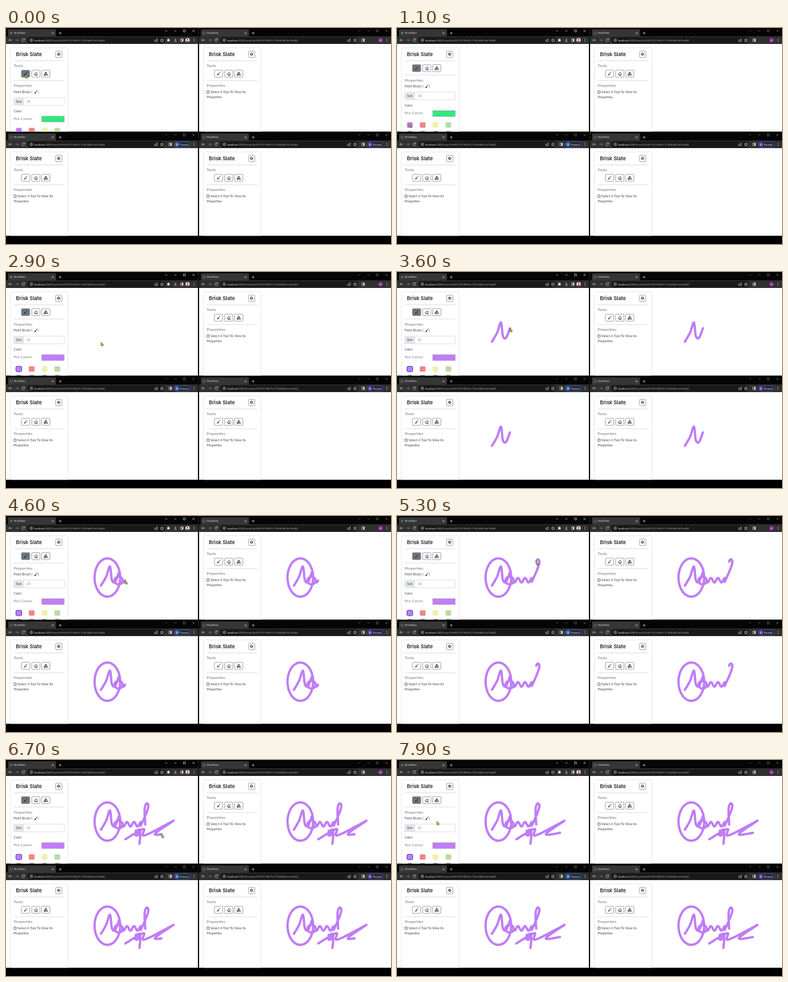
Animation, 600 px wide and 338 px high, one loop 8000 ms. Source, as an HTML page:

```html
<!DOCTYPE html>
<html lang="en">
<head>
<meta charset="utf-8">
<title>Shared whiteboard</title>
<style>
html, body { margin: 0; width: 100%; height: 100%; overflow: hidden; background: #000; }
svg { display: block; width: 600px; height: 338px; }
text { font-family: Lato, sans-serif; font-size: 5.2px; fill: #4a4a4a; }
.title { font: 600 7.9px Inter, sans-serif; fill: #222; }
.head { font-size: 6.4px; fill: #777; }
.soft { fill: #858585; }
.ui { font: 4.05px Roboto, sans-serif; fill: #ddd; }
.dim { fill: #9aa0a6; }
.line { stroke: #d2d2d2; stroke-width: .7; }
.btn { fill: #fff; stroke: #7b8289; stroke-width: .7; }
.on { fill: #6c757d; }
.ico { fill: none; stroke: #d0d0d0; stroke-width: .7; }
.glyph { fill: none; stroke: #222; stroke-width: .9; }
#ink { fill: none; stroke: #bf7cf6; stroke-width: 3.6; stroke-linecap: round; stroke-linejoin: round; }
</style>
</head>
<body>
<svg id="stage" viewBox="0 0 600 338"></svg>
<script>
const LOOP = 8000, STEP = 100, SCROLL_AT = 700, PICK_AT = 1400, ICON_AT = 3000;
const PURPLE = '#c27cfb', GREEN = '#2fe97c';
const HASH = 'de9f6723198fd7c710e9d4b7ea7de4b2';

const rect = (x, y, w, h, attrs = '') => `<rect x="${x}" y="${y}" width="${w}" height="${h}" ${attrs}/>`;
const text = (x, y, s, cls = '') => `<text x="${x}" y="${y}" class="${cls}">${s}</text>`;
const path = (d, cls = 'ico', attrs = '') => `<path d="${d}" class="${cls}" ${attrs}/>`;
const dot = (x, y, r, attrs) => `<circle cx="${x}" cy="${y}" r="${r}" ${attrs}/>`;
const rule = y => path(`M12 ${y}H91`, 'line');

const brush = (x, y) => path(`M${x + 2.4} ${y - 2.6}L${x - .4} ${y + .6}`, 'glyph') +
  path(`M${x - 1} ${y}l1.4 1.2q-.8 1.8-3 1.3q1-.7 1.6-2.5z`, '', 'fill="#222"');

const gear = dot(82, 41, 1.5, 'class="glyph"') +
  dot(82, 41, 2.1, 'class="glyph" stroke-dasharray=".8 .85"');

function tools(active) {
  const box = (x, on) => rect(x, 66, 13, 11, `rx="1.6" class="btn ${on ? 'on' : ''}"`);
  return box(24, active) + box(40) + box(55.5) + brush(30.5, 71.5) +
    path('M44.3 72l2.6-2.6 2.1 1.8-2.6 2.7h-1.2zM46.4 74h3', 'glyph') +
    path('M62 68.8l1.5 2.2h-3zM59.4 72.3h2v1.8h-2z', 'glyph') + dot(63.7, 73.2, 1, 'class="glyph"');
}

function brushPanel() {
  const row = ['#c27cfb', '#f48484', '#eef2aa', '#bbdca2'];
  return text(12, 102, 'Paint Brush (') + brush(46.5, 100) + text(50, 102, ')') +
    rect(12, 109, 79, 12, 'rx="1.2" fill="#fff" stroke="#ced4da" stroke-width=".7"') +
    rect(12.3, 109.3, 16, 11.4, 'fill="#e3e6ea"') + text(15.5, 116.8, 'Size') + text(32, 116.8, '10', 'soft') +
    text(12, 131.8, 'Color') + text(12, 143.8, 'Pick Custom', 'soft') +
    rect(55.8, 138, 35, 9, `id="picked" fill="${GREEN}" stroke="#999" stroke-width=".6"`) +
    row.map((c, i) => rect(15.5 + 20 * i, 156.3, 9, 8.4, `rx="1.8" fill="${c}"`) +
      rect(15.5 + 20 * i, 170.2, 9, 8.4, 'rx="1.8" fill="#24242a"')).join('') +
    rect(15.5, 156.3, 9, 8.4, 'id="chosen" rx="1.8" fill="none" stroke="#3a49c9"');
}

const hint = dot(14.2, 100.2, 2.3, 'class="glyph" style="stroke-width:.6"') +
  '<text x="14.2" y="101.7" text-anchor="middle" style="font-size:4.2px">?</text>' +
  text(18, 102, 'Select A Tool To View Its') + text(12, 110, 'Properties');

function paused(color) {
  return rect(261.5, 14.8, 26.5, 8.6, `rx="4.3" fill="#262a35" stroke="${color}" stroke-width=".6"`) +
    dot(266.5, 19.1, 3.1, `fill="${color}"`) + text(265.2, 20.5, 'A', 'ui') + text(271, 20.6, 'Paused', 'ui');
}

function chrome(main, badge) {
  const sideX = main ? 274 : 256;
  return rect(0, 0, 299.3, 25, 'fill="#050505"') +
    rect(3, 2, 75, 14, 'rx="2" fill="#363636"') +
    dot(8, 8, 1.8, main ? 'id="icon" fill="#3f8fb5"' : 'fill="#242424" stroke="#aaa" stroke-width=".6"') +
    text(12.5, 9.4, 'BriskSlate', 'ui') +
    path('M71.2 6.5l3 3m0-3l-3 3M84.5 6v4m-2-2h4') +
    path('M262.5 4.5h3M276.5 3h3v3h-3zM290.8 3l3 3m0-3l-3 3M248 3.8l1.5 1.5 1.5-1.5', 'ico', main ? '' : 'opacity=".5"') +
    rect(0, 13, 299.3, 12, 'fill="#303030"') + rect(33, 14.2, 215, 9.8, 'rx="4.9" fill="#191919"') +
    path('M9.5 19h-5l2-2m-2 2l2 2') + path('M14.5 19h5l-2-2m2 2l-2 2', 'ico', 'opacity=".5"') +
    path('M28.8 17.6a2.2 2.2 0 1 0 .3 2M29.2 16.2v1.9h-1.9') +
    dot(39.5, 19, 2, 'class="ico"') + path('M39.5 18.6v1.5M39.5 17.6v.5') +
    `<text x="44" y="20.5" class="ui">localhost<tspan class="dim">:3000/board/${HASH}</tspan></text>` +
    path('M232 18v3h4v-2M233.5 19.5q.3-2 2.7-2m-1-1l1 1-1 1') +
    path('M243.2 16.6l.8 1.6 1.8.2-1.3 1.2.3 1.8-1.6-.9-1.6.9.3-1.8-1.3-1.2 1.8-.2z') +
    rect(sideX - 2, 17, 4, 4, 'class="ico"') + rect(sideX, 17, 2, 4, 'fill="#ddd"') +
    (main ? rect(251.3, 17.5, 3.7, 3.5, 'fill="#ddd"') + dot(253.1, 17.3, .8, 'fill="#ddd"') +
      path('M264 16.5v3m-1.4-1.3l1.4 1.4 1.4-1.4M262 21h4') : '') +
    badge + [-1, 0, 1].map(k => dot(293, 19.1 + 1.9 * k, .55, 'fill="#ddd"')).join('');
}

function pane(x, y, badge, main = false) {
  return `<g transform="translate(${x} ${y})" clip-path="url(#pane)">` +
    rect(0, 0, 299.3, 162.3, 'fill="#fff"') +
    rect(7, 31, 89.7, 150, 'rx="1.5" fill="#fff" stroke="#dedede" stroke-width=".7"') +
    text(15.5, 44.2, 'Brisk Slate', 'title') +
    rect(77.3, 36.2, 9.8, 10, 'rx="1.5" class="btn"') + gear + rule(51.3) +
    `<g clip-path="url(#body)"><g ${main ? 'id="scroll"' : ''}>` +
    text(12, 61.2, 'Tools', 'head') + tools(main) + rule(82.3) +
    text(12, 92.4, 'Properties', 'head') + (main ? brushPanel() : hint) + '</g></g>' +
    '<use href="#ink"/>' + chrome(main, badge) + '</g>';
}

const photo = dot(283, 19, 3.3, 'fill="#f1e6e4"') + dot(283, 18, 1.2, 'fill="#7d4a45"') +
  path('M280.7 21.2q2.3-3 4.6 0q-2.3 2-4.6 0z', '', 'fill="#b5443f"');
const initial = dot(283, 19, 3.3, 'fill="#9b2fae"') + text(281.6, 20.5, 'H', 'ui');

const byId = id => document.getElementById(id);
byId('stage').innerHTML =
  '<defs><clipPath id="pane"><path d="M0 0H299.3V162.3H0z"/></clipPath>' +
  '<clipPath id="body"><path d="M0 52H98V163H0z"/></clipPath><path id="ink"/></defs>' +
  pane(0, 0, photo, true) + pane(300.7, 0, initial) +
  pane(0, 163, paused('#3f78d8')) + pane(300.7, 163, paused('#7047c9')) +
  path('M0 0v5.2l1.3-1 1 2 1-.5-1-1.9h1.8z', '', 'id="cursor" fill="#d5e52c" stroke="#2c3506" stroke-width=".6"');

// Curves map u (0 to 1) to a point
const spline = (...p) => u => {
  const last = p.length / 2 - 1;
  const i = Math.min(last - 1, Math.floor(u * last)), f = u * last - i;
  const at = (k, axis) => p[2 * Math.max(0, Math.min(last, k)) + axis];
  return [0, 1].map(axis => {
    const [a, b, c, d] = [-1, 0, 1, 2].map(k => at(i + k, axis));
    return b + f / 2 * (c - a + f * (2 * a - 5 * b + 4 * c - d + f * (3 * (b - c) + d - a)));
  });
};
const oval = (cx, cy, rx, ry, turns) => u => {
  const a = -1 - u * turns * 2 * Math.PI;
  return [cx + rx * Math.cos(a), cy + ry * Math.sin(a)];
};
const wave = (x0, x1, y, height, period) => u => {
  const dx = u * (x1 - x0);
  return [x0 + dx, y - height * Math.cos(2 * Math.PI * dx / period)];
};

const moves = [];
const move = (start, end, curve, down = false) => moves.push({ start, end, curve, down });
const ink = (start, end, curve) => move(start, end, curve, true);

move(100, 900, spline(30, 73, 19, 150));
move(1400, 2000, spline(19, 150, 140, 104, 144, 97));
move(2200, 2900, spline(144, 97, 166, 114, 148, 110));
ink(3000, 3600, spline(148, 109, 156, 95, 162, 79, 165, 100, 170, 103, 176, 88));
ink(3700, 4350, oval(158, 96.3, 20, 30, 1));
ink(4380, 4560, oval(175.5, 101, 6.3, 6, 1.05));
ink(4560, 5000, wave(183, 210.5, 100.5, -3.5, 11));
ink(5000, 5420, spline(210, 103, 218, 85, 222, 72, 219, 68, 216, 77, 217, 101));
ink(5480, 5760, spline(202, 111, 210, 109, 205, 118, 201, 116, 209, 113, 208, 131));
move(5760, 5950, spline(208, 131, 196, 119, 186, 124));
ink(5950, 6200, spline(186, 124, 214, 108, 216, 118, 261, 95));
ink(6200, 6850, spline(261, 95, 232, 116, 254, 114));
move(7200, 7900, spline(254, 114, 62, 96));

function pointer(t) {
  let from = moves[0].curve(0), since = 0;
  for (const { start, end, curve } of moves) {
    if (t < start) {
      const u = (t - since) / (start - since), to = curve(0);
      return from.map((v, k) => v + (to[k] - v) * u);
    }
    if (t <= end) return curve((t - start) / (end - start));
    from = curve(1);
    since = end;
  }
  return from;
}

function inkPath(t) {
  let d = '';
  for (const { start, end, curve, down } of moves) {
    if (!down || t < start) continue;
    const u = Math.min(1, (t - start) / (end - start));
    const n = Math.max(1, Math.ceil(u * 40));
    for (let i = 0; i <= n; i++) {
      d += (i ? 'L' : 'M') + curve(u * i / n).map(v => v.toFixed(2)).join(' ');
    }
  }
  return d;
}

function draw(now) {
  const t = Math.floor(now / STEP) * STEP % LOOP;
  const picked = t >= PICK_AT;
  byId('scroll').setAttribute('transform', `translate(0 ${t < SCROLL_AT ? 0 : -8.7})`);
  byId('picked').setAttribute('fill', picked ? PURPLE : GREEN);
  byId('chosen').setAttribute('opacity', picked ? 1 : 0);
  byId('icon').setAttribute('fill', t < ICON_AT ? '#3f8fb5' : '#4d7d68');
  byId('ink').setAttribute('d', inkPath(t));
  byId('cursor').setAttribute('transform', `translate(${pointer(t).join(' ')})`);
}

function tick() {
  draw(performance.now());
  requestAnimationFrame(tick);
}
tick();
</script>
</body>
</html>
```
